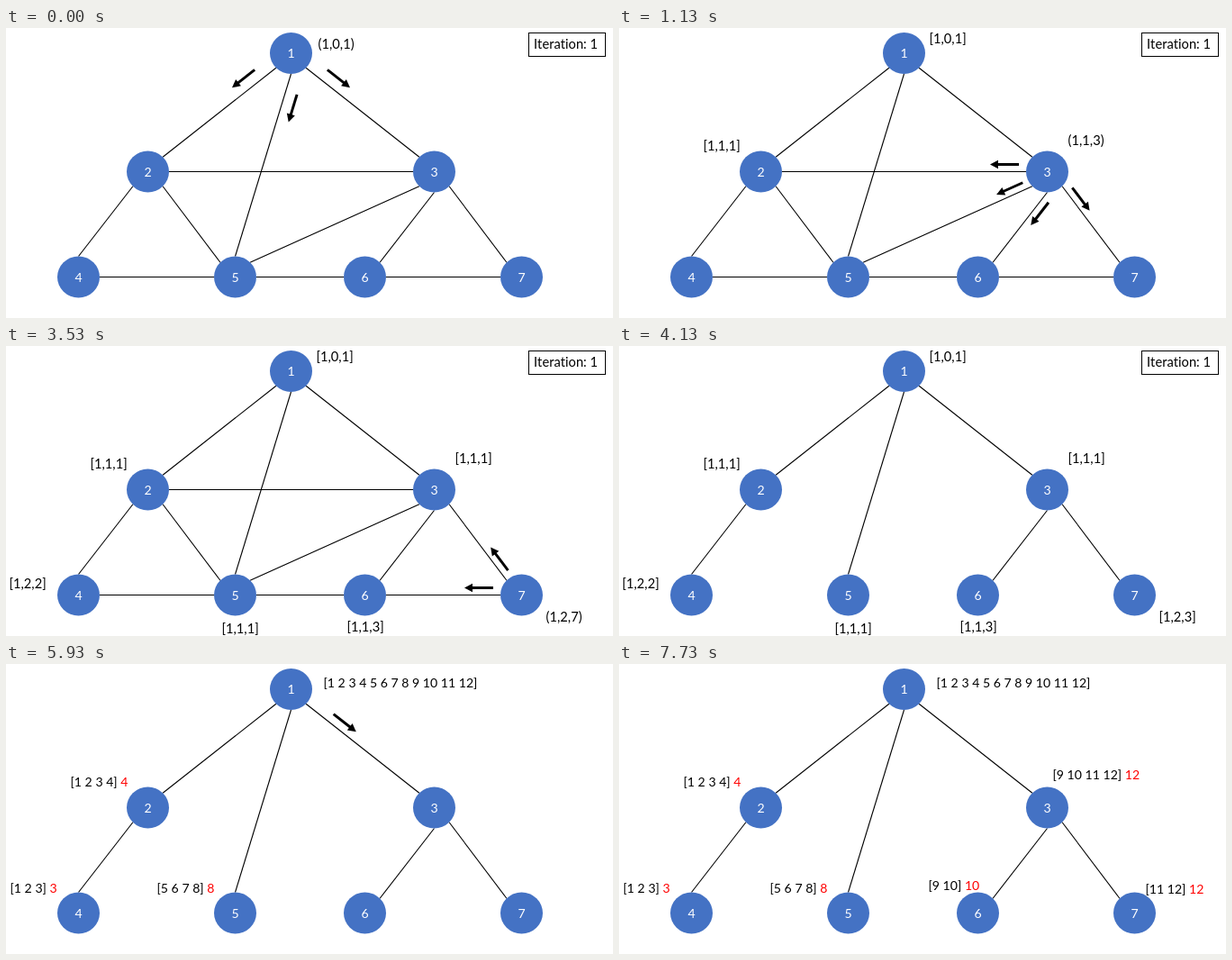
Animation, 674 px wide and 322 px high, one loop 8.33 s. Source, as an HTML page:

```html
<!DOCTYPE html>
<html lang="en">
<head>
<meta charset="utf-8">
<title>Spanning tree</title>
<style>
  html, body { margin: 0; width: 100%; height: 100%; overflow: hidden; background: #fff; }
  svg { display: block; width: 100vw; height: 100vh; }
  text { font: 14.7px Lato, "Open Sans", sans-serif; font-kerning: none; font-variant-ligatures: none; }
  .edge { stroke: #000; stroke-width: 1.1; }
  .arrow { stroke: #000; stroke-width: 3; }
  .node ellipse { fill: #4472c4; }
  .node text { fill: #fff; text-anchor: middle; }
  .node text, .list { font-size: 14.1px; }
  .result { fill: #f00; }
</style>
</head>
<body>
<svg id="stage" viewBox="0 0 674 322"></svg>
<script>
const FIRST_STEP = 530, STEP = 600, LOOP = 8330;
const TREE_STEP = 7;    // non-tree edges disappear
const NUMBER_STEP = 8;  // the numbers are handed down the tree
const RX = 23.5, RY = 23, ARROW_LENGTH = 32;

// tag and list are label offsets from the centre; shift moves the tag while its node is sending.
// The node receives the numbers first..last at the given step.
const nodes = [
  { x: 316.5, y: 28, parent: 1, level: 0, sends: "235", tag: [28, -16], shift: [2, 6], list: [36, -7], first: 1, last: 12, step: 8 },
  { x: 157.5, y: 159.5, parent: 1, level: 1, sends: "345", tag: [-64, -29], shift: [7, 0], list: [-86, -29], first: 1, last: 4, step: 9 },
  { x: 475.5, y: 159.5, parent: 1, level: 1, sends: "2567", tag: [23, -35], list: [6, -37], first: 9, last: 12, step: 11 },
  { x: 80.5, y: 276.5, parent: 2, level: 2, sends: "25", tag: [-77, -13], list: [-76, -28], first: 1, last: 3, step: 10 },
  { x: 254.5, y: 276.5, parent: 1, level: 1, sends: "2346", tag: [-15, 37], list: [-87, -28], first: 5, last: 8, step: 10 },
  { x: 398.5, y: 276.5, parent: 3, level: 1, sends: "37", tag: [-20, 35], list: [-55, -31], first: 9, last: 10, step: 13 },
  { x: 572.5, y: 276.5, parent: 3, level: 2, sends: "36", tag: [27, 24], list: [12, -27], first: 11, last: 12, step: 13 }
];
nodes.forEach((node, i) => node.id = i + 1);

// A compass direction names the point of the ellipse where an edge is attached.
const edges = ("1SW-2NE 1S-5N 1SE-3NW 2E-3W 2SW-4N 2SE-5NW 3SW-5NE 3S-6NE 3SE-7NW " +
  "4E-5W 5E-6W 6E-7W").split(" ").map(text => {
  const ends = text.split("-").map(attach);
  return { ends, inTree: nodes[ends[1].id - 1].parent === ends[0].id };
});

function attach(end) {
  const node = nodes[end[0] - 1];
  const dx = end.includes("E") - end.includes("W");
  const dy = end.includes("S") - end.includes("N");
  const size = Math.hypot(dx, dy);
  return { id: node.id, x: node.x + RX * dx / size, y: node.y + RY * dy / size };
}

const line = (kind, a, b) =>
  `<line class="${kind}" x1="${a.x}" y1="${a.y}" x2="${b.x}" y2="${b.y}"/>`;

const write = (x, y, content, kind = "") =>
  `<text class="${kind}" x="${x}" y="${y + 5.3}">${content}</text>`;

const drawNode = ({ x, y, id }) =>
  `<g class="node"><ellipse cx="${x}" cy="${y}" rx="${RX}" ry="${RY}"/>${write(x, y, id)}</g>`;

// An arrow runs beside its edge: above it, or to the right of steep edges while searching.
function arrow(from, to, inTree) {
  const { ends } = edges.find(({ ends: [a, b] }) =>
    a.id === from && b.id === to || a.id === to && b.id === from);
  const [a, b] = ends[0].id === from ? ends : [ends[1], ends[0]];
  const angle = Math.atan2(b.y - a.y, b.x - a.x);
  const cos = Math.cos(angle), sin = Math.sin(angle);
  const steep = Math.abs(sin) > Math.abs(cos);
  const side = steep && !inTree ? -Math.sign(sin) : -Math.sign(cos);
  const gap = (from === 1 ? 20 : 8) + (inTree ? 11 : 0);
  const offset = side * (inTree ? 10 : from === 1 ? 13 : 8);
  return `<g transform="translate(${a.x} ${a.y}) rotate(${angle * 180 / Math.PI}) ` +
    `translate(${gap + ARROW_LENGTH} ${offset})">` +
    line("arrow", { x: -ARROW_LENGTH, y: 0 }, { x: -7, y: 0 }) +
    `<path d="M0 0L-9 -4.7V4.7Z"/></g>`;
}

function tag({ id, x, y, parent, level, tag: [dx, dy], shift = [0, 0] }, step) {
  return step === id - 1
    ? write(x + dx + shift[0], y + dy + shift[1], `(1,${level},${id})`)
    : write(x + dx, y + dy, `[1,${level},${parent}]`);
}

function numberList({ id, x, y, list: [dx, dy], first, last }) {
  const numbers = Array.from({ length: last - first + 1 }, (_, i) => first + i);
  const result = id > 1 ? ` <tspan class="result">${last}</tspan>` : "";
  return write(x + dx, y + dy, `[${numbers.join(" ")}]${result}`, "list");
}

function searchScene(step) {
  const sender = nodes[step];
  return [
    ...[...(sender?.sends ?? "")].map(to => arrow(sender.id, +to, false)),
    ...nodes.filter(node => step >= node.id - 1).map(node => tag(node, step)),
    `<rect x="580.5" y="5.5" width="85" height="26" fill="none" stroke="#000"/>`,
    write(586, 18, "Iteration: 1")
  ];
}

function numberScene(step) {
  return [
    ...nodes.filter(node => node.id > 1 && step === node.step - 1)
      .map(node => arrow(node.parent, node.id, true)),
    ...nodes.filter(node => step >= node.step).map(numberList)
  ];
}

function scene(step) {
  return [
    ...edges.filter(edge => edge.inTree || step < TREE_STEP).map(edge => line("edge", ...edge.ends)),
    ...nodes.map(drawNode),
    ...(step < NUMBER_STEP ? searchScene(step) : numberScene(step))
  ].join("");
}

const stage = document.getElementById("stage");
let shownStep = -1;

function draw() {
  const time = performance.now() % LOOP;
  const step = Math.floor((time - FIRST_STEP) / STEP) + 1;
  if (step !== shownStep) {
    stage.innerHTML = scene(step);
    shownStep = step;
  }
  requestAnimationFrame(draw);
}
draw();
</script>
</body>
</html>
```
